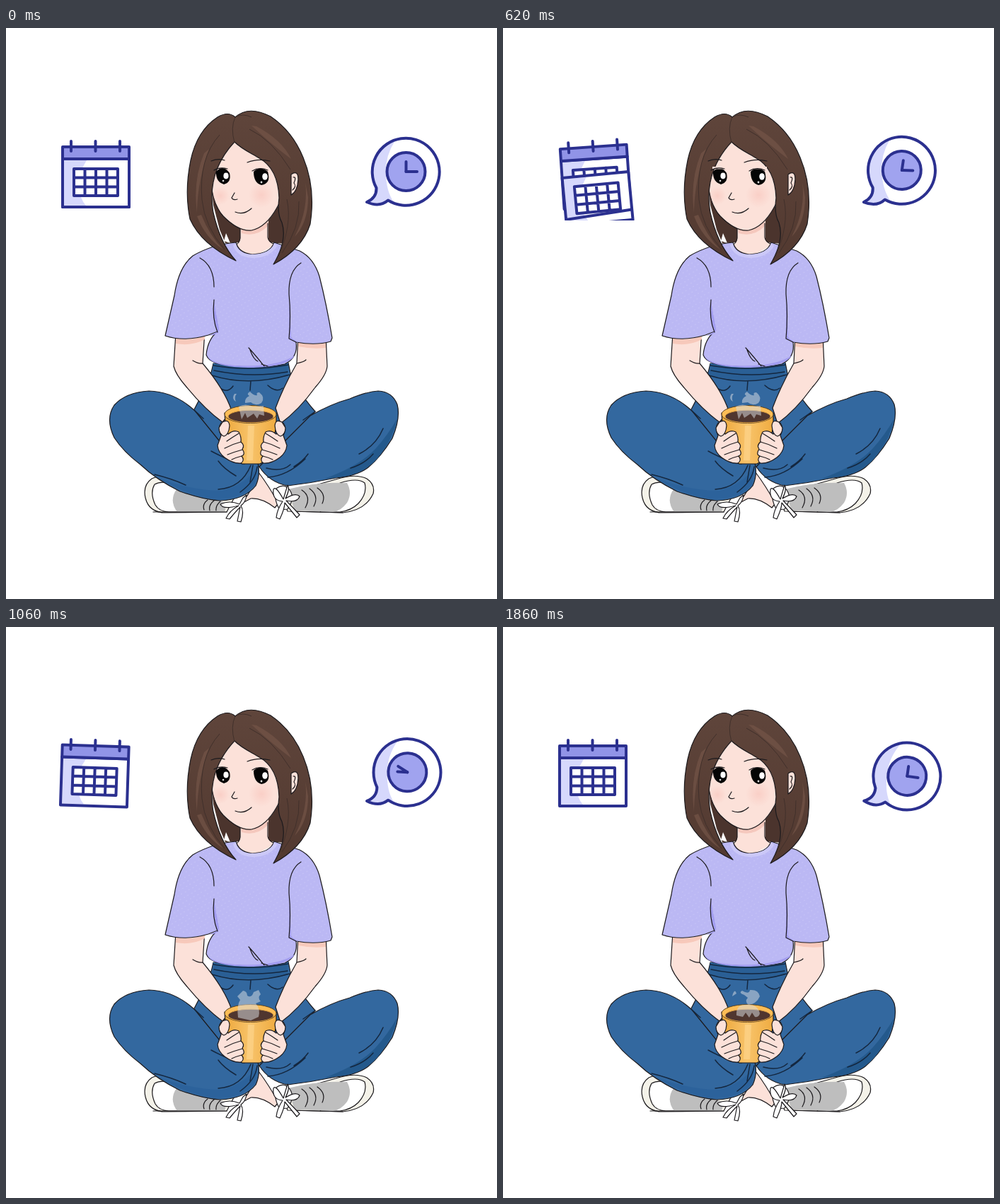
Write an HTML page that moves like this. It is 694 by 807 pixels and loops after 1890 ms.

```html
<!DOCTYPE html>
<html lang="en">
<head>
<meta charset="utf-8">
<title>Coffee break</title>
<style>
html, body { margin: 0; width: 100%; height: 100%; overflow: hidden; background: #fff; }
svg { display: block; width: 100vw; height: 100vh; }
.ink { stroke: #1c1a1d; stroke-width: 1.2; stroke-linecap: round; stroke-linejoin: round; }
.fold { fill: none; stroke: #14273f; stroke-width: 1.5; stroke-linecap: round; }
.line { fill: none; stroke: #1c1a1d; stroke-width: 1.2; stroke-linecap: round; }
.icon { stroke: #2b308f; stroke-width: 4; stroke-linecap: round; stroke-linejoin: round; }
.skin { fill: #fce1d9; }
.denim { fill: #33689f; }
.hair { fill: #4b342d; }
.steam { fill: #d9dde2; fill-opacity: .52; }
</style>
</head>
<body>
<svg viewBox="0 0 694 807">
<defs>
  <clipPath id="calClip"><rect x="40" y="130" width="170" height="142"/></clipPath>
  <radialGradient id="blush"><stop offset="0" stop-color="#f7b9b0" stop-opacity=".45"/><stop offset="1" stop-color="#f7b9b0" stop-opacity="0"/></radialGradient>
  <linearGradient id="mug"><stop offset="0" stop-color="#eda83c"/><stop offset=".5" stop-color="#f8c36a"/><stop offset="1" stop-color="#efab40"/></linearGradient>
  <linearGradient id="hairTone" x1="0" y1="0" x2="0" y2="1"><stop offset="0" stop-color="#5f453b"/><stop offset="1" stop-color="#523930"/></linearGradient>
  <pattern id="weave" width="9" height="8" patternUnits="userSpaceOnUse" patternTransform="rotate(12)">
    <path d="M1 2l2-1M5 6l2-1" stroke="#dcd9fb" stroke-width=".9" opacity=".4"/>
  </pattern>
  <g id="page">
    <rect x="80" y="185" width="94" height="68" fill="#fff"/>
    <path d="M82 187H114Q102 205 103 223T113 251H82Z" fill="#d6d8fc"/>
    <rect class="icon" x="80" y="185" width="94" height="68" fill="none"/>
    <rect x="96" y="199" width="62" height="38" fill="#fff"/>
    <path class="icon" fill="none" d="M96 199H158V237H96ZM96 211.5H158M96 224.5H158M111.5 199V237M127 199V237M142.5 199V237"/>
  </g>
  <path id="bubbleShape" d="M523.5 226A47.5 47.5 0 1 1 540 243.5Q528 254 510 246Q524 240 523.5 226Z"/>
</defs>

<g id="shoes">
  <path class="skin ink" d="M333 672Q350 650 357 628Q372 648 385 672L380 678Q362 664 346 665Z"/>
  <path class="ink" fill="#f4f2e9" d="M250 640Q222 629 206 637Q193 646 197 664Q202 685 226 685L312 684L322 665Z"/>
  <path class="ink" fill="#fff" d="M244 648Q222 638 210 645Q203 657 211 674Q216 683 230 684L262 684Z"/>
  <path fill="#bebebe" d="M241 652Q258 651 300 667L312 672L309 684H242Q230 668 241 652Z"/>
  <path class="line" d="M285 667Q277 673 280 681M294 668Q286 674 288 682M303 669Q296 675 297 682M208 684H312"/>
  <path class="ink" fill="#f4f2e9" d="M466 638Q494 629 510 637Q522 645 519 658Q508 682 476 685L398 683L388 660Z"/>
  <path class="ink" fill="#fff" d="M472 643Q497 635 507 643Q511 658 498 672Q488 682 472 684L444 684Z"/>
  <path fill="#bebebe" d="M398 652Q440 641 482 643Q490 657 482 671Q473 683 462 684L408 682Z"/>
  <path class="line" d="M418 653Q432 662 423 678M429 651Q443 661 435 676M440 650Q453 659 447 672M405 683L476 685"/>
  <path class="ink" fill="#fff" d="M383 650Q394 643 401 653Q409 664 398 680L387 681Q377 665 383 650Z"/>
</g>

<g id="legs">
  <path class="denim ink" d="M293 474Q289 494 281 510L265 541L330 620H370L437 542Q414 516 402 488L399 473Z"/>
  <path class="denim ink" d="M267 541Q238 514 202 513Q169 515 153 533Q140 552 153 579Q166 599 190 617Q212 638 246 655Q280 667 302 668Q337 667 353 647Q360 631 356 615L310 594Z"/>
  <path class="denim ink" d="M430 548Q460 531 486 524Q510 514 526 513Q546 514 553 532Q558 551 546 580Q530 606 512 621Q496 633 466 636Q432 643 398 647Q372 642 358 620L388 590Z"/>
  <path fill="#24598c" d="M553 552Q547 580 530 602Q511 628 478 634L450 637Q498 620 522 595Q540 575 553 552Z"/>
  <path fill="#28609a" opacity=".6" d="M215 636Q263 664 300 666Q335 665 352 646L355 620Q340 645 304 654Q260 653 215 636Z"/>
  <path fill="#2a5f95" d="M293 474Q346 484 399 473L398 492Q346 503 291 491Z"/>
  <path class="fold" d="M293 477Q346 486 399 476M294 484Q346 495 398 486M291 491Q343 507 401 490M346 499L345 512M304 510Q314 516 321 506M370 505Q382 516 391 509M267 541L279 552M437 542L420 554M290 598Q322 615 337 616M300 612Q308 623 325 633M210 631Q235 637 254 646M300 652Q333 650 346 618M331 656Q353 640 355 620M345 642L349 618M370 635Q398 633 423 609M368 622Q390 628 402 617M407 620Q420 612 427 602M499 602Q523 590 533 566M487 622Q507 616 519 602"/>
</g>

<path class="hair" d="M288 205L293 250L302 285L310 304L332 303L338 270L322 235ZM367 255L371 303L395 305L399 250Z"/>
<path fill="#fff" d="M311 290L308 301L317 304Z"/>
<path class="skin" d="M331 272V299Q330 305 322 308L345 326L382 306Q372 304 371 299V262Z"/>
<path fill="#f5c8bd" d="M332 282Q352 291 370 271V280Q354 296 333 290Z"/>
<path class="line" d="M331 283V297Q330 304 324 307M370 276V296Q371 302 378 305"/>

<g id="arms">
  <path class="skin ink" d="M240 431L237 478Q240 490 254 506Q281 539 306 557L319 541Q309 511 278 474L281 428Z"/>
  <path class="skin ink" d="M413 434L411 474Q393 505 381 537L388 559Q414 540 437 508Q453 490 454 478L452 434Z"/>
  <path fill="#f7c9bb" d="M240 438Q262 444 281 434V440Q263 450 240 446ZM413 443Q434 449 452 445V452Q432 454 413 450Z"/>
  <path class="line" d="M264 470Q272 475 278 474M411 474Q421 472 424 469"/>
</g>

<path id="shirt" class="ink" fill="#bbb8f4" d="M325 303Q291 306 264 322Q244 338 238 378L225 435Q252 444 286 434L299 429Q285 440 283 462Q288 476 324 478Q368 481 394 475Q413 466 410 444Q438 449 459 443L461 438Q453 390 443 351Q435 325 415 315L379 303Q374 319 348 320Q329 318 325 303Z"/>
<path fill="#a29df0" d="M294 387Q292 414 299 429L287 435Q302 433 301 425ZM400 378Q400 414 400 440L413 445L403 437ZM284 462Q288 474 324 477Q382 480 408 463Q400 478 350 480Q288 480 284 462Z"/>
<path fill="url(#weave)" d="M325 306Q280 309 259 333Q243 359 228 432Q258 440 296 427L287 466Q340 477 401 467L406 441H457Q447 360 429 329Q417 316 379 306Q348 333 325 306Z"/>
<path class="line" d="M274 325Q294 336 294 366M294 384Q291 411 299 430M417 332Q399 343 400 376Q403 407 400 439L410 444M343 452Q353 463 365 478M345 455Q350 469 356 471M361 475L370 478"/>
<path fill="#cbc8f8" d="M325 304Q326 319 348 320Q374 319 379 304L383 308Q374 325 348 325Q325 323 321 307Z"/>

<g id="head">
  <path class="skin" d="M322 150Q293 178 290 211Q289 239 304 262Q326 287 347 286Q370 281 384 252L395 220L378 172Z"/>
  <path class="line" d="M290 219Q292 249 307 266Q329 288 347 286Q370 281 386 248"/>
  <circle cx="303" cy="237" r="13" fill="url(#blush)"/><circle cx="361" cy="236" r="18" fill="url(#blush)"/>
  <path class="ink" fill="url(#hairTone)" d="M324 126Q314 117 299 126Q270 145 261 187Q252 231 260 270Q276 306 325 329Q303 305 293 261Q283 204 323 161C334 172 349 178 358 184C376 194 385 212 386 240Q383 263 390 275Q398 300 378 334Q419 312 430 277Q438 226 420 183Q405 146 374 125Q343 109 324 126Z"/>
  <path fill="#745548" opacity=".7" d="M347 138Q377 166 403 185Q390 158 354 139ZM280 177Q264 215 270 261Q270 219 287 171ZM423 218Q428 257 408 295Q427 275 427 239ZM270 266Q282 297 307 313Q288 294 276 264Z"/>
  <path fill="none" stroke="#41302b" d="M323 162Q317 141 324 126Q334 120 347 126M302 151Q272 184 277 243Q281 281 309 313M344 143Q376 158 402 200M397 242Q405 278 385 323M414 245Q416 283 390 318"/>
  <path class="skin ink" d="M403 207Q413 200 413 214Q412 231 403 236Z"/>
  <path class="line" d="M406 211Q411 210 407 219Q411 224 405 229"/>
  <g id="eyes">
    <path d="M297 203Q307 192 316 205Q319 218 308 221Q296 217 297 203ZM350 203Q359 194 370 203Q375 220 361 222Q350 219 350 203Z" fill="#050505"/>
    <ellipse cx="311" cy="209" rx="3.6" ry="4.4" fill="#fff"/><circle cx="307" cy="216" r="1.3" fill="#ddd"/>
    <ellipse cx="366" cy="210" rx="3.8" ry="4.8" fill="#fff"/><circle cx="361" cy="218" r="1.4" fill="#ddd"/>
  </g>
  <g id="lids" class="skin"><rect x="296" y="196" width="21"/><rect x="349" y="196" width="24"/></g>
  <path class="line" d="M290 188Q300 184 309 187M341 190Q356 184 373 188M294 201Q302 196 313 199M348 202Q358 196 370 201"/>
  <path class="line" d="M323 233L319 240Q321 244 327 242M324 260Q336 265 347 255"/>
</g>

<g id="cup">
  <path class="ink" fill="url(#mug)" d="M309 544Q310 574 319 594Q326 613 334 616H359Q371 610 377 588Q383 565 382 544Z"/>
  <ellipse cx="345.5" cy="546" rx="36.5" ry="12.5" fill="#fcbd56" stroke="#5c4420"/>
  <ellipse cx="346" cy="549" rx="32" ry="8.8" fill="#50362f" stroke="#d69a40"/>
  <path fill="#ffd894" opacity=".55" d="M342 562H351L349 611H340Z"/>
</g>

<g id="steam">
  <g class="steam">
    <path d="M323 517Q318 524 325 528Q322 522 326 517Z"/>
    <path d="M338 530Q337 523 344 520Q339 517 345 514Q350 520 355 519Q353 515 358 515Q367 522 361 530Q353 535 346 529Z"/>
    <path d="M329 535Q338 530 349 535L364 534L365 548L358 546L355 552L350 545L341 551L338 544L333 553Z"/>
  </g>
  <g class="steam">
    <path d="M325 518Q328 511 330 518L324 522Z"/>
    <path d="M341 520Q332 517 338 514Q348 520 349 513Q361 512 363 522Q358 533 347 534Q341 529 346 524Z"/>
    <path d="M330 549Q329 535 341 534Q360 532 363 546Q362 552 356 551L352 545L348 552L343 545L339 551Z"/>
  </g>
  <g class="steam">
    <path d="M326 513L330 517L324 517Z"/>
    <path d="M354 513Q361 514 361 523Q358 530 351 530L356 536Q362 540 356 554L349 551L344 555Q331 551 332 539Q331 526 336 523Q348 525 351 523Q358 521 354 513Z"/>
  </g>
  <g class="steam">
    <path d="M335 514Q341 515 341 521Q347 525 350 516L357 513L360 519Q355 524 360 529L353 532Q360 540 357 551L346 556L328 552Q326 534 331 527L327 522Z"/>
  </g>
</g>

<g id="hands">
  <g id="hand">
    <path class="skin ink" d="M304 558Q299 565 304 576L299 590Q300 600 309 607Q321 616 332 615Q338 611 333 605Q339 603 334 595Q338 590 332 585Q333 578 329 571Q322 567 314 574Z"/>
    <path class="line" d="M312 584Q319 579 329 573M309 594Q320 588 332 585M313 603Q323 599 334 596M333 605Q325 607 319 610"/>
    <path class="skin ink" d="M306 557Q315 552 316 562Q315 575 308 577Q301 574 301 565Z"/>
  </g>
  <use href="#hand" transform="matrix(-1 0 0 1 696 0)"/>
</g>

<g class="ink" fill="#fff">
  <path d="M330 673Q316 667 303 673Q306 681 329 675Q316 682 311 693L316 694Q325 683 331 677L327 697L332 698Q337 683 332 675Q339 670 340 660L335 664Z"/>
  <path d="M392 666Q381 646 378 652Q376 668 391 669Q383 681 382 692L387 694Q394 679 394 671L411 692L415 688Q405 677 396 668Q412 671 415 662Q410 656 395 665Q402 651 398 646Z"/>
</g>

<g clip-path="url(#calClip)">
  <g id="calendar">
    <use href="#page"/>
    <g id="ring"><circle cx="102" cy="206" r="14.5" fill="none" stroke="#c9caf9" stroke-width="4"/><rect class="icon" x="96" y="199" width="13.5" height="13" fill="#fff"/></g>
    <use id="sheet" href="#page"/>
    <path id="flap" class="icon" fill="none" d="M83 268L175 260"/>
    <rect class="icon" x="80" y="168" width="94" height="17" fill="#9194e7"/>
    <path class="icon" d="M92 160V174M126.500 160V174M161 160V174"/>
  </g>
</g>

<g id="bubble">
  <use href="#bubbleShape" fill="#fff"/>
  <path fill="#d6d8fc" d="M513 246Q524 239 520 217Q513 176 550 159Q536 181 537 204Q537 230 548 246L540 243Q527 250 513 246Z"/>
  <use href="#bubbleShape" class="icon" fill="none"/>
  <circle class="icon" cx="565.5" cy="203" r="27" fill="#a0a3ef"/>
  <path id="minute" class="icon" d="M565.5 203V189"/>
  <path id="hour" class="icon" d="M565.5 203H581"/>
</g>
</svg>
<script>
const LOOP = 1890;
const el = id => document.getElementById(id);
const set = (id, name, value) => el(id).setAttribute(name, value);
const show = (node, on) => { node.style.display = on ? '' : 'none'; };

// Keys are [time, value] pairs, eased between neighbours.
function track(t, keys, ease = u => u * u * (3 - 2 * u)) {
  if (t <= keys[0][0]) return keys[0][1];
  for (let i = 1; i < keys.length; i++) {
    const [a, from] = keys[i - 1], [b, to] = keys[i];
    if (t < b) return from + (to - from) * ease((t - a) / (b - a));
  }
  return keys[keys.length - 1][1];
}
const linear = u => u;

const swing = [[30, 0], [280, 9], [520, -2.2], [720, -5.6], [910, 3.5], [980, 5], [1100, .8], [1180, 0]];
const drop = [[90, 0], [250, 10.5], [510, 15], [740, 31], [910, 74], [980, 100]];
const tilt = [[300, 0], [510, -1], [740, -2], [910, -8]];
const sway = [[300, 0], [450, 8], [510, 5], [740, -10], [910, 4], [970, 8.5], [1110, 0], [1660, 0], [1860, 8]];
const blink = [[430, 0], [510, .12], [560, .4], [640, 0]];
const steamFrames = [...el('steam').children];
const lids = [...el('lids').children];

function drawCalendar(t) {
  set('calendar', 'transform', `rotate(${track(t, swing)} 126 158)`);
  set('sheet', 'transform', `translate(0 ${track(t, drop, linear)}) rotate(${track(t, tilt)} 126 185)`);
  show(el('sheet'), t < 980);
  show(el('flap'), t > 440 && t < 810);
  const pulse = track(t, [[1130, 0], [1230, 1], [1400, 1], [1520, 0]]);
  set('ring', 'opacity', pulse);
  set('ring', 'transform', `translate(102 206) scale(${.6 + .4 * pulse}) translate(-102 -206)`);
}

function drawClock(t) {
  const turn = 360 * Math.min(1, Math.max(0, (t - 560) / 660)) ** 1.95;
  set('bubble', 'transform', `rotate(${track(t, sway)} 512 248)`);
  set('minute', 'transform', `rotate(${turn * 3} 565.5 203)`);
  set('hour', 'transform', `rotate(${turn} 565.5 203)`);
}

function drawSteam(t) {
  const phase = t % 615;
  const active = phase < 10 || phase >= 530 ? 0 : phase < 165 ? 1 : phase < 345 ? 2 : 3;
  steamFrames.forEach((node, i) => show(node, i === active));
}

function drawLids(t) {
  const closed = track(t, blink);
  show(el('lids'), closed > 0);
  lids.forEach(lid => lid.setAttribute('height', 2 + closed * 25));
}

const start = performance.now();
function frame() {
  const t = (performance.now() - start) % LOOP;
  drawCalendar(t);
  drawClock(t);
  drawSteam(t);
  drawLids(t);
  requestAnimationFrame(frame);
}
frame();
</script>
</body>
</html>
```
